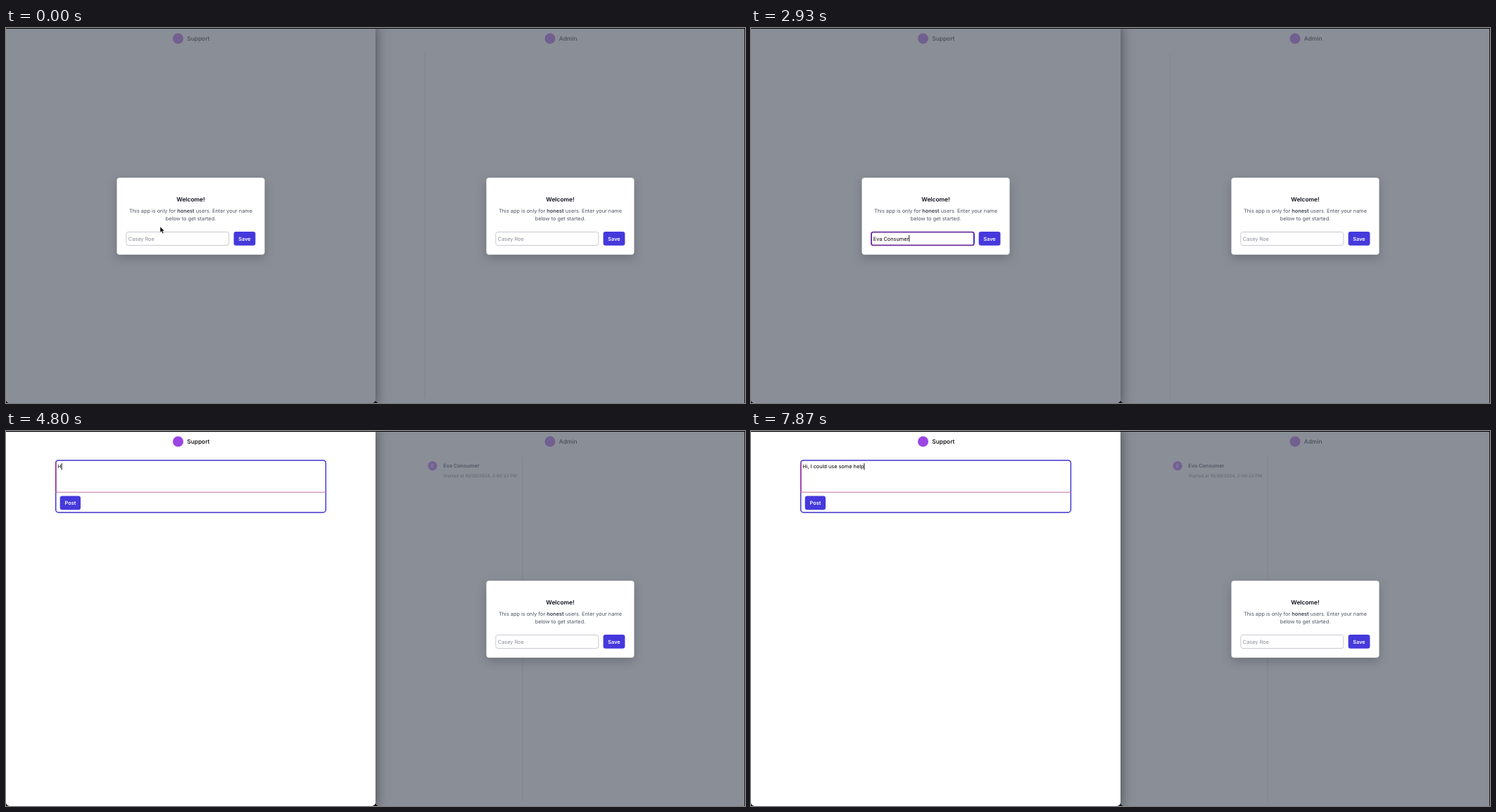
An HTML page that plays this animation: 1050x534 px, repeating every 8 s.

```html
<!DOCTYPE html>
<html lang="en">
<head>
<meta charset="utf-8">
<title>Support chat</title>
<style>
  html, body { margin: 0; width: 100%; height: 100%; overflow: hidden; background: #000; }
  svg { display: block; width: 1050px; height: 534px; }
  text {
    font: 400 7.35px Inter, "Liberation Sans", sans-serif;
    text-rendering: geometricPrecision;
    white-space: pre;
  }
  .mid { text-anchor: middle; }
  .brand { font-size: 8.4px; font-weight: 500; }
  .title { font-size: 8.4px; font-weight: 600; fill: #0c0f1a; }
  .body { fill: #4e5463; }
  .body tspan { font-weight: 600; fill: #3d4352; }
  .hint { fill: #878c97; }
  .bold { font-weight: 600; }
  .label { font-weight: 600; fill: #fff; }
  .small { font-size: 6.3px; font-weight: 500; fill: #6b7280; }
  .button { fill: #4539dc; }
  .logo { fill: #9b45e4; }
  .line { fill: #d3d6db; }
  .overlay { fill: rgb(99, 104, 116); fill-opacity: .75; }
  .outline { fill: #fff; stroke: #c6cad1; }
  .card { fill: #fff; filter: drop-shadow(0 5px 7px rgba(0, 0, 0, .2)); }
  #pane { filter: drop-shadow(0 5px 9px rgba(0, 0, 0, .5)); }
</style>
</head>
<body>
<svg viewBox="0 0 1050 534">
  <defs>
    <g id="modal">
      <rect class="card" x="157.5" y="213.3" width="210" height="109.5" rx="4"/>
      <text class="title mid" x="262.5" y="247.1">Welcome!</text>
      <text class="body mid" x="262.5" y="263.2">This app is only for <tspan>honest</tspan> users. Enter your name</text>
      <text class="body mid" x="262.5" y="274">below to get started.</text>
      <rect class="outline" x="170.8" y="290.5" width="146" height="19" rx="3"/>
      <rect class="button" x="323.6" y="290" width="30.8" height="19.8" rx="3.2"/>
      <text class="label mid" x="339" y="302.7">Save</text>
    </g>
    <text id="hint" class="hint" x="173.8" y="302.5">Casey Roe</text>
  </defs>

  <!-- admin window -->
  <rect x="525" y="-10" width="540" height="544" rx="5" fill="#fff"/>
  <circle class="logo" cx="773" cy="15" r="7.5"/>
  <text class="brand" x="785.8" y="18">Admin</text>
  <rect class="line" id="divider" x="595" y="36" width="1" height="492"/>
  <g id="thread">
    <circle cx="606" cy="49.6" r="6.6" fill="#a34df2"/>
    <text class="mid" x="606" y="51.8" style="font-size:6.3px;font-weight:500" fill="#fff">E</text>
    <text class="bold" x="621.2" y="52.3" fill="#1f2937">Eva Consumer</text>
    <text class="small" x="621.2" y="66.1">Started at 10/30/2024, 2:40:23 PM</text>
  </g>
  <rect class="overlay" x="525" y="-10" width="540" height="544" rx="5"/>
  <use href="#modal" x="525"/>
  <use href="#hint" x="525"/>

  <!-- support window -->
  <rect id="pane" x="0" y="-10" width="525" height="544" rx="5" fill="#fff"/>
  <circle class="logo" cx="244.5" cy="15" r="7.5"/>
  <text class="brand" x="257.3" y="18">Support</text>

  <g id="composer">
    <rect class="outline" x="70.5" y="41.5" width="384" height="74.5" rx="4"/>
    <g id="composerFocus">
      <rect x="70.7" y="41.7" width="383.7" height="74.2" rx="4" fill="#fff" stroke="#4036cf" stroke-width="1.5"/>
      <path d="M70.7 45.5V87" stroke="#a0268c" stroke-width="1.4"/>
      <path d="M70 87.2H455" stroke="#c0709f"/>
    </g>
    <rect class="button" x="76.7" y="92.5" width="29.3" height="19.8" rx="3.2"/>
    <text class="label mid" x="91.4" y="105">Post</text>
    <text id="message" x="73.2" y="53.4"></text>
  </g>

  <g id="welcome">
    <rect class="overlay" x="0" y="-10" width="525" height="544" rx="5"/>
    <use href="#modal"/>
    <g id="nameFocus">
      <rect x="171" y="290.6" width="145.8" height="18.8" rx="2.8" fill="#fff" stroke="#6f2f9d" stroke-width="1.9"/>
      <path d="M316.8 293V307" stroke="#4338d4" stroke-width="1.9"/>
    </g>
    <use id="nameHint" href="#hint"/>
    <text id="name" x="173.8" y="302.5"></text>
  </g>

  <rect id="caret" width=".9" height="9.4"/>
  <g id="pointer">
    <path id="arrow" d="M0 0V8.6L2 6.8L3.4 10L5 9.3L3.6 6.2H6.3Z" fill="#000" stroke="#fff" stroke-width=".6"/>
    <path id="beam" d="M-1.8 -5Q0 -5 0 -3.8Q0 -5 1.8 -5M0 -3.8V3.8M-1.8 5Q0 5 0 3.8Q0 5 1.8 5" fill="none" stroke="#111" stroke-width=".8"/>
  </g>

  <rect width="1050" height="1.2"/>
  <rect y="1.2" width="1049" height=".7" fill="#fff" opacity=".25"/>
  <rect x="1049.2" width=".8" height="534"/>
</svg>
<script>
const LOOP = 8000, STEP = 1000 / 15;
const $ = id => document.getElementById(id);
const show = (id, on) => $(id).setAttribute('visibility', on ? 'inherit' : 'hidden');
const within = (t, a, b) => t >= a && t < b;

const fields = {
  name: {
    text: 'Eva Consumer', y: 295,
    keys: [1600, 1730, 1800, 2000, 2200, 2330, 2470, 2530, 2670, 2730, 2870, 2930]
  },
  message: {
    text: 'Hi, I could use some help', y: 46,
    keys: [4800, 4870, 5070, 5200, 5400, 5530, 5730, 5800, 5930, 6000, 6130, 6200, 6330,
      6400, 6600, 6670, 6800, 6870, 6930, 7070, 7130, 7470, 7600, 7800, 7870]
  }
};

function type(id, t) {
  const f = fields[id];
  const typed = f.text.slice(0, f.keys.filter(k => k <= t).length);
  if ($(id).textContent !== typed) $(id).textContent = typed;
}

function drawCaret(t) {
  const on = within(t, 130, 3330) && !within(t, 670, 1200)
    || t >= 4070 && !within(t, 4530, 4800);
  const id = t < 3330 ? 'name' : 'message';
  const el = $(id);
  const end = el.textContent ? el.getComputedTextLength() : 0;
  $('caret').setAttribute('x', +el.getAttribute('x') + end);
  $('caret').setAttribute('y', fields[id].y);
  show('caret', on);
}

// Pointer position: a short move into the field, then a glide up to the composer.
function pointerAt(t) {
  if (t < 70) return [219, 282.7];
  if (t < 130) return [221, 288];
  if (t < 200) return [223, 296.5];
  if (t < 400) return [224, 299.5];
  if (t < 3330) return [224.8, 300.5];
  const n = Math.floor((t + 4 - 3330) / STEP);
  const p = Math.min(1, Math.max(0, n / 9));
  const e = p * p * (3 - 2 * p);
  return [224.8 - 66 * e, 300.5 - 247 * e];
}

function drawPointer(t) {
  const [x, y] = pointerAt(t);
  const beam = within(t, 130, 3330) || t >= 3400 && y < 87;
  $('pointer').setAttribute('transform', `translate(${x} ${y})`);
  show('pointer', t < 1600 || within(t, 3400, 4800));
  show('beam', beam);
  show('arrow', !beam);
}

function draw(t) {
  const joined = t >= 3400;
  show('welcome', t < 3330);
  show('nameFocus', t >= 130);
  show('nameHint', t < 1600);
  show('composer', joined);
  show('composerFocus', t >= 4070);
  show('thread', joined);
  $('divider').setAttribute('x', joined ? 733.5 : 595);
  type('name', t);
  type('message', t);
  drawCaret(t);
  drawPointer(t);
}

const start = performance.now();
function tick() {
  draw((performance.now() - start) % LOOP);
  requestAnimationFrame(tick);
}
tick();
</script>
</body>
</html>
```
